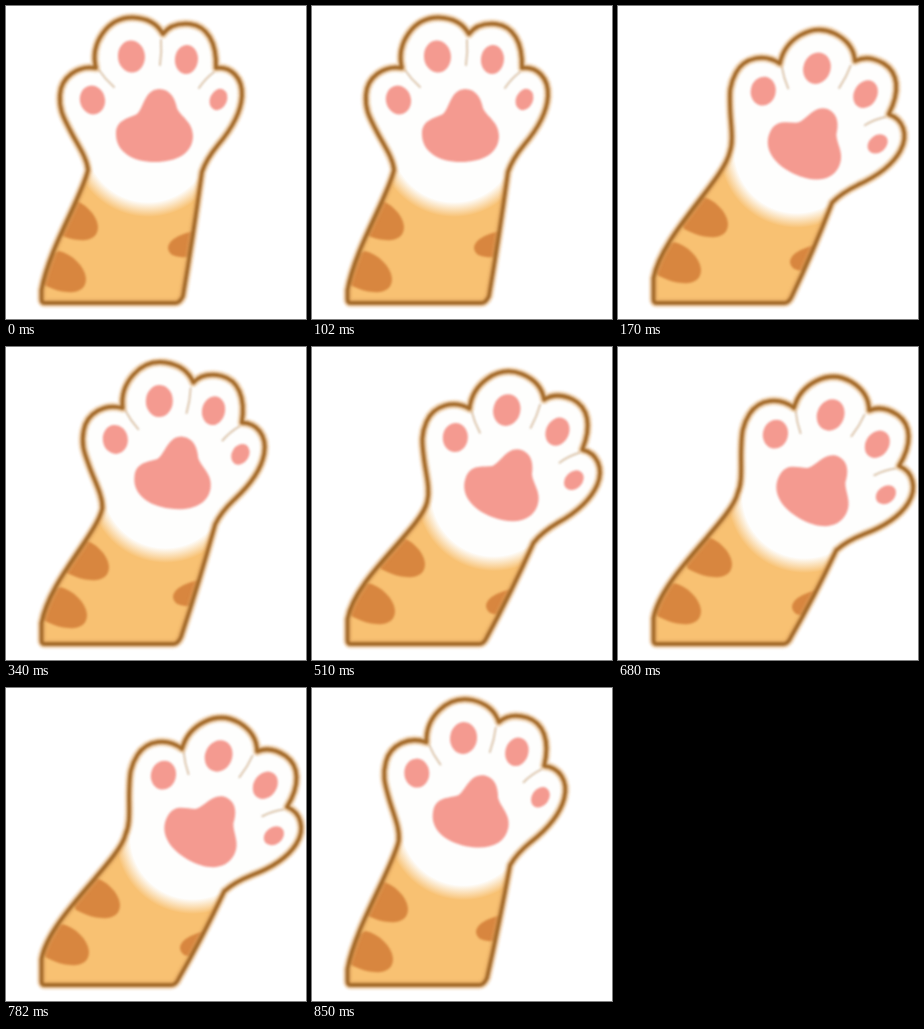
Animation, 300 px wide and 313 px high, one loop 1.02 s. Source, as an HTML page with a canvas:

```html
<!DOCTYPE html>
<html lang="en">
<head>
<meta charset="utf-8">
<title>Waving paw</title>
<style>
  html, body { margin: 0; width: 100%; height: 100%; overflow: hidden; background: #fff; }
  canvas { display: block; width: 300px; height: 313px; }
</style>
</head>
<body>
<canvas id="stage" width="300" height="313"></canvas>
<script>
const ctx = document.getElementById('stage').getContext('2d');
const STEP = 170;
const PIVOT = { x: 151.25, y: 72.5 };
const COLORS = {
  fur: '#f8c172', stripe: '#d8863f', white: '#fefefd',
  pad: '#f49a90', ink: '#a56c2c', glow: 'rgba(222,160,92,.42)', crease: '#dcc6ae'
};

// hand: position of the pivot; knee: height of the lower left corner; foot: lower right x
const POSES = [
  { turn: 0,    hand: [151.2, 72.5], knee: 284, foot: 174, upper: [72, 214], lower: [60, 266], side: [175, 239] },
  { turn: 25,   hand: [213, 93],     knee: 272, foot: 171, upper: [90, 211], lower: [63, 257], side: [185, 253] },
  { turn: 7,    hand: [176.2, 79],   knee: 276, foot: 172, upper: [83, 213], lower: [61, 261], side: [180, 247] },
  { turn: 20,   hand: [211.5, 92.5], knee: 272, foot: 172, upper: [93, 210], lower: [63, 257], side: [187, 256] },
  { turn: 29,   hand: [224.5, 99.7], knee: 271, foot: 170, upper: [94, 210], lower: [63, 257], side: [187, 257] },
  { turn: 11.3, hand: [172.5, 76.7], knee: 281, foot: 172, upper: [76, 214], lower: [61, 264], side: [177, 241] }
];

const WRIST_LEFT = [82, 164];
const WRIST_RIGHT = [196, 166];
const HAND = new Path2D(`M82 164 C81 151 71 138 64 124 C58 112 53 104 54 89
  C55 71 72 59 90 62 C84 38 101 11 127 11.5 C142 12 152 19 157 28
  C163 20 173 17 184 18 C201 20 211 36 210 62 C225 60 237 72 236 90
  C235 107 224 125 212 139 C203 150 199 157 196 166`);
const PALM = new Path2D(`M153 83 C164 83 169 92 171 102 C175 111 187 116 187 130
  C187 147 171 156 149 156 C127 156 110 146 110 128 C110 114 121 113 131 108
  C138 102 138 84 153 83Z`);
const CREASES = new Path2D('M93 64 Q99 73 108 81 M155 34 Q156 46 154 59 M208 66 Q199 73 193 82');
const BLOB = new Path2D('M-8-21 C6-19 20-4 20 7 C20 18 10 21 2 20 C-8 20-15 16-24 12 L-34-8Z');
const SIDE_BLOB = new Path2D('M16-14 C-2-12-13-4-13 3 C-12 12-2 13 13 12 L30 0Z');
const TOES = [
  [86.5, 94, 12.5, 14.5, -15], [125.5, 50.5, 13.5, 16, -5],
  [180.5, 53.5, 11.5, 14.5, 5], [212.5, 93.5, 8.5, 11, 25]
];

const radians = degrees => degrees * Math.PI / 180;
const soften = px => { ctx.filter = px ? `blur(${px}px)` : 'none'; };

function handMatrix({ turn, hand }) {
  return new DOMMatrix().translate(...hand).rotate(turn).translate(-PIVOT.x, -PIVOT.y);
}

function bodyPath({ knee, foot }, matrix) {
  const at = ([x, y]) => matrix.transformPoint({ x, y });
  const left = at(WRIST_LEFT), right = at(WRIST_RIGHT);

  const arm = new Path2D();
  arm.moveTo(right.x, right.y);
  arm.quadraticCurveTo((right.x + foot) / 2 + 2, (right.y + 297) / 2, foot + 3, 290);
  arm.quadraticCurveTo(foot, 297, foot - 5, 297);
  arm.lineTo(39, 297);
  arm.quadraticCurveTo(35.5, 297, 35.5, 293);
  arm.lineTo(35.5, knee);
  arm.bezierCurveTo(43, knee - 42, left.x - 6, left.y + 27, left.x, left.y);

  const body = new Path2D();
  body.addPath(HAND, matrix);
  body.addPath(arm);
  return body;
}

function blob(path, [x, y]) {
  ctx.save();
  ctx.translate(x, y);
  ctx.fill(path);
  ctx.restore();
}

function outline(path, color, width, blur) {
  soften(blur);
  ctx.strokeStyle = color;
  ctx.lineWidth = width;
  ctx.stroke(path);
}

function fillWhite() {
  const fade = ctx.createRadialGradient(142, 134, 62, 142, 134, 77);
  fade.addColorStop(0, COLORS.white);
  fade.addColorStop(1, 'rgba(254,254,253,0)');
  ctx.fillStyle = COLORS.white;
  ctx.fillRect(20, -20, 250, 173);
  ctx.fillStyle = fade;
  ctx.fillRect(20, 150, 250, 70);
}

function drawPads() {
  outline(CREASES, COLORS.crease, 2, .8);
  soften(1);
  ctx.fillStyle = COLORS.pad;
  ctx.fill(PALM);
  for (const [x, y, rx, ry, tilt] of TOES) {
    ctx.beginPath();
    ctx.ellipse(x, y, rx, ry, radians(tilt), 0, Math.PI * 2);
    ctx.fill();
  }
}

function draw(pose) {
  const matrix = handMatrix(pose);
  const body = bodyPath(pose, matrix);

  ctx.clearRect(0, 0, 300, 313);
  ctx.lineCap = ctx.lineJoin = 'round';
  ctx.save();
  ctx.clip(body);
  ctx.fillStyle = COLORS.fur;
  ctx.fillRect(0, 0, 300, 313);
  soften(1.2);
  ctx.fillStyle = COLORS.stripe;
  blob(BLOB, pose.upper);
  blob(BLOB, pose.lower);
  blob(SIDE_BLOB, pose.side);

  soften(0);
  ctx.transform(matrix.a, matrix.b, matrix.c, matrix.d, matrix.e, matrix.f);
  fillWhite();
  drawPads();
  ctx.restore();

  outline(body, COLORS.glow, 9, 1);
  outline(body, COLORS.ink, 4, .8);
  soften(0);
}

let shown = -1;

function tick(now) {
  const index = Math.floor(now / STEP) % POSES.length;
  if (index !== shown) draw(POSES[shown = index]);
  requestAnimationFrame(tick);
}

tick(0);
</script>
</body>
</html>
```
